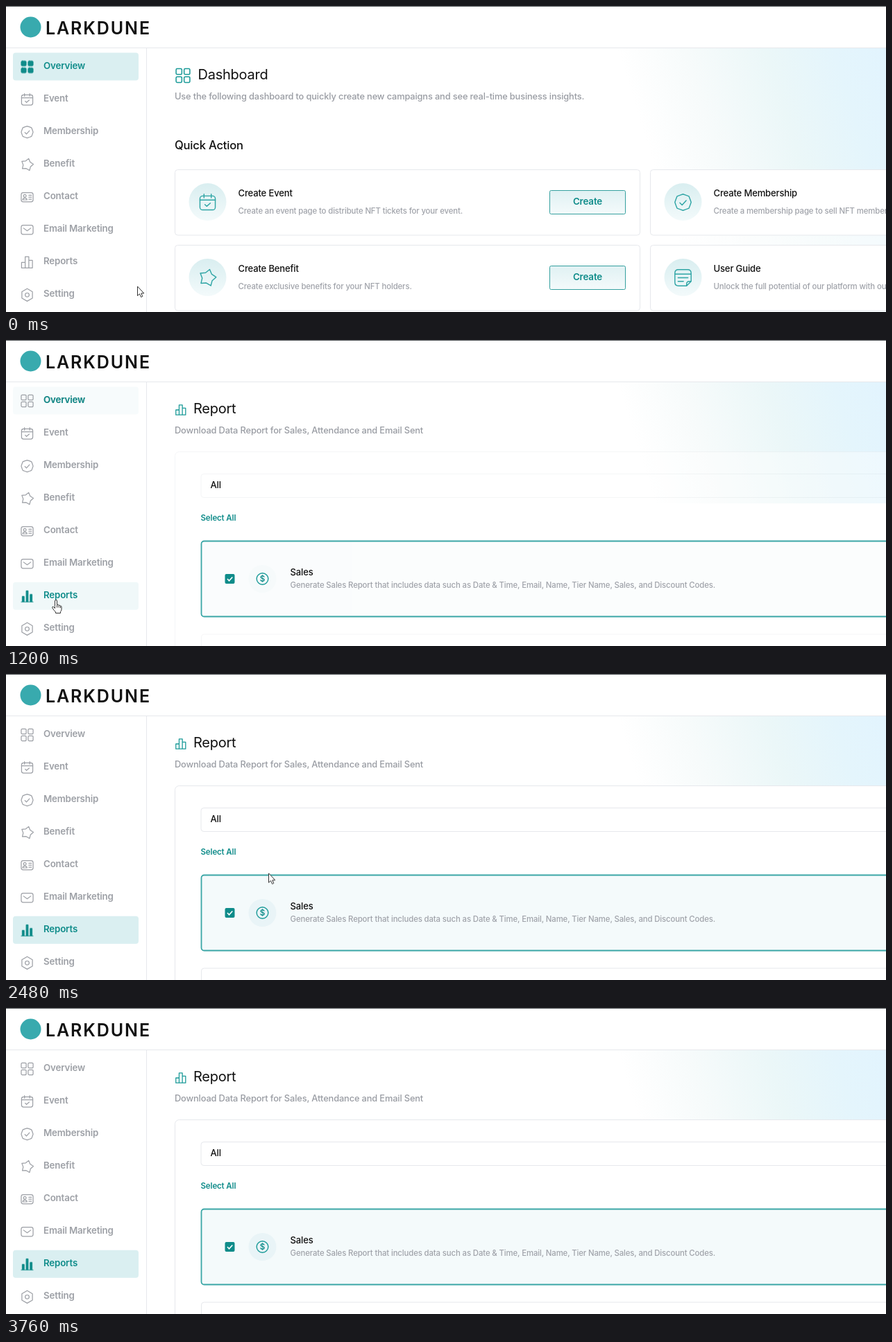
Animation of 1268 by 442 pixels, one loop 4 s. Source, as an HTML page:

```html
<!DOCTYPE html>
<html lang="en">
<head>
<meta charset="utf-8">
<title>Dashboard</title>
<style>
html, body { margin: 0; width: 100%; height: 100%; overflow: hidden; background: #fff; }
svg { display: block; width: 1268px; height: 442px; }
text { font-family: Inter, "Open Sans", sans-serif; font-weight: 500; letter-spacing: -.012em; fill: #111; stroke: none; }
use { fill: none; stroke: currentColor; stroke-linecap: round; stroke-linejoin: round; }
#tiles use { fill: inherit; }
.brand { font-size: 25px; font-weight: 600; letter-spacing: 1.9px; }
.title { font-size: 20px; font-weight: 420; }
.sub { font-size: 12.85px; fill: #999ca3; }
.section { font-size: 16.6px; }
.name { font-size: 13.05px; }
.note { font-size: 11.4px; fill: #a0a3aa; }
.menu { font-size: 13.3px; font-weight: 600; fill: #9da0a6; }
.button { font-size: 13.4px; font-weight: 600; text-anchor: middle; }
.link { font-size: 11.5px; font-weight: 600; }
.teal { fill: #0f8c8a; }
.line { fill: #fff; stroke: #e6e8ec; }
.grey { color: #9da0a6; }
.green { color: #1a9a98; }
.action { color: #2fa5a5; }
.solid { color: #0f8c8a; }
.solid use { fill: currentColor; }
.bar { fill: #daeff1; }

.before, .late, .leaving, .after, .ramp, .pointer, .pointer > * {
  animation: 4s step-end infinite;
}
.before { animation-name: before; }
.after { animation-name: after; }
.late { animation-name: late; }
.leaving { animation-name: leaving; }
.ramp { animation-name: ramp; }
@keyframes before { 0% { opacity: 1 } 30%, 100% { opacity: 0 } }
@keyframes after { 0% { opacity: 0 } 30%, 100% { opacity: 1 } }
@keyframes late { 0% { opacity: 1 } 34%, 100% { opacity: 0 } }
@keyframes leaving { 0% { opacity: 1 } 30% { opacity: .2 } 32% { opacity: .1 } 34% { opacity: .05 } 36%, 100% { opacity: 0 } }
@keyframes ramp { 0% { opacity: 0 } 30% { opacity: .4 } 32% { opacity: .7 } 34% { opacity: .9 } 36%, 100% { opacity: 1 } }

/* The pointer advances every 80 ms, 2% of the loop. */
.pointer { animation-name: travel; }
@keyframes travel {
  0% { transform: translate(189px, 405px); animation-timing-function: steps(2) }
  4% { transform: translate(152px, 399px); animation-timing-function: steps(2) }
  8% { transform: translate(105px, 386px); animation-timing-function: steps(3) }
  14% { transform: translate(72px, 378px) }
  16%, 42% { transform: translate(72px, 375px) }
  44% { transform: translate(112px, 377px); animation-timing-function: steps(4) }
  52% { transform: translate(400px, 367px); animation-timing-function: steps(3) }
  58% { transform: translate(418px, 372px); animation-timing-function: steps(7) }
  72% { transform: translate(278px, 77px); animation-timing-function: steps(3) }
  78% { transform: translate(320px, 74px); animation-timing-function: steps(3) }
  84% { transform: translate(526px, 50px); animation-timing-function: steps(4) }
  92% { transform: translate(715px, 3px) }
  94%, 100% { transform: translate(740px, -30px) }
}
.pointer > .arrow { animation-name: arrow; }
.pointer > .hand { animation-name: hand; }
.pointer > .blur { animation-name: blur; }
@keyframes arrow { 0% { opacity: 1 } 2% { opacity: 0 } 46% { opacity: 1 } 50% { opacity: 0 } 62%, 100% { opacity: 1 } }
@keyframes hand { 0% { opacity: 0 } 2% { opacity: 1 } 46% { opacity: 0 } 50% { opacity: 1 } 52% { opacity: 0 } 54% { opacity: 1 } 62%, 100% { opacity: 0 } }
@keyframes blur { 0% { opacity: 0 } 52% { opacity: 1 } 54%, 100% { opacity: 0 } }
</style>
</head>
<body>
<svg viewBox="0 0 1268 442" xmlns="http://www.w3.org/2000/svg">
  <defs>
    <linearGradient id="tint" gradientUnits="userSpaceOnUse" x1="880" y1="60" x2="1234" y2="-51">
      <stop offset="0" stop-color="#fff"/>
      <stop offset=".25" stop-color="#f7fbfb"/>
      <stop offset=".55" stop-color="#ebf7f8"/>
      <stop offset=".8" stop-color="#e4f5fc"/>
      <stop offset="1" stop-color="#e2f4fe"/>
    </linearGradient>
    <linearGradient id="fade" x2="0" y2="1">
      <stop stop-color="#fff" stop-opacity="0"/><stop offset=".5" stop-color="#fff" stop-opacity=".6"/>
    </linearGradient>
    <linearGradient id="halo" x2="0" y2="1">
      <stop stop-color="#d9eef0"/><stop offset="1" stop-color="#f3fafb"/>
    </linearGradient>
    <linearGradient id="press" x2="0" y2="1">
      <stop stop-color="#e0f1f3"/><stop offset="1" stop-color="#f4fafb"/>
    </linearGradient>
    <radialGradient id="smudge">
      <stop stop-color="#cfc6bd"/><stop offset=".55" stop-color="#a3958b"/>
      <stop offset=".85" stop-color="#8d8079"/><stop offset="1" stop-color="#b5aaa4" stop-opacity="0"/>
    </radialGradient>
    <path id="tile" d="M-7.500-9h4.500q1.500 0 1.500 1.500v4.500q0 1.500-1.500 1.500h-4.500q-1.500 0-1.500-1.500v-4.500q0-1.500 1.500-1.500z"/>
    <g id="tiles">
      <use href="#tile"/><use href="#tile" x="10.500"/><use href="#tile" y="10.500"/><use href="#tile" x="10.500" y="10.500"/>
    </g>
    <g id="event">
      <rect x="-8.500" y="-7" width="17" height="15.500" rx="3"/>
      <path d="M-8.500-2.500H8.500M-4-9v4M4-9v4M-3 2.500l2 2 4-3.500"/>
    </g>
    <path id="badge" d="M0-9 3.500-7.800 6.600-6.600 7.800-3.500 9 0 7.800 3.500 6.600 6.600 3.500 7.800 0 9-3.500 7.800-6.600 6.600-7.800 3.500-9 0-7.800-3.500-6.600-6.600-3.500-7.800zM-3.500.5l2.500 2.500 4.500-5"/>
    <path id="star" transform="rotate(14)" d="M0-9.500 3.500-4.900 9-2.900 5.700 1.900 5.600 7.700 0 6-5.600 7.700-5.700 1.900-9-2.900-3.500-4.900z"/>
    <g id="contact">
      <rect x="-9" y="-7" width="18" height="14" rx="3"/><circle cx="-3.500" cy="-2" r="2"/>
      <path d="M-6.800 4q.5-2.800 3.300-2.800T-.2 4zM2.500-3h4M2.500 0h4M2.500 3h4"/>
    </g>
    <g id="mail"><rect x="-9" y="-7" width="18" height="14" rx="3"/><path d="M-5.500-2.500 0 1.500 5.500-2.500"/></g>
    <path id="bars" d="M-8.500 8.500V0H-3v8.500zM-3 8.500v-17h5.500v17zM2.500 8.500V-3H8v11.500z"/>
    <path id="blocks" d="M-7.500 8V0h3v8zM-1.500 8V-8.500h3V8zM4.500 8v-11h3V8zM-9 8.500H9"/>
    <g id="setting"><path d="M0-9.500 8-4.800V4.800L0 9.500-8 4.800V-4.800z"/><circle r="3"/></g>
    <path id="guide" d="M-5-9H5q4 0 4 4V4L4 9H-5q-4 0-4-4V-5q0-4 4-4zM9 4H7Q4 4 4 7v2M-9-4H9M-5.500 0h11M-5.500 4h6"/>
  </defs>

  <rect width="1268" height="442" fill="#fff"/>
  <rect x="203" y="61" width="1065" height="381" fill="url(#tint)"/>
  <rect x="203" y="230" width="1065" height="212" fill="url(#fade)"/>
  <g id="dashboard" class="before"></g>
  <g id="report"></g>

  <path d="M0 60.500H1268M202.500 60V442" stroke="#e6e8ec"/>
  <path d="M0 .5H1268" stroke="#55585c"/>
  <circle cx="35.500" cy="30.500" r="15" fill="#38aaae"/>
  <text class="brand" x="57" y="41">LARKDUNE</text>
  <g id="side"></g>

  <g class="pointer">
    <path class="arrow" d="M.5 0V13.500L3.500 10.800 5.600 15.500 7.800 14.500 5.800 10H9.800z" fill="#fff" stroke="#333" stroke-linejoin="round"/>
    <path class="hand" d="M-1.500 9.500V2Q-1.500.5 0 .5T1.500 2V7.500Q3.500 6.500 4 8.300 6 7.500 6.300 9.200 8 8.700 8 10.500V14Q8 16 6.500 17.500V19.500H-.5V18Q-3 15.500-5.300 11.800-5.500 9.800-3.800 10.300L-1.500 12.500zM1.500 8v3.500M4 8.500v3M6.300 9.500v2.500" fill="#fff" stroke="#333" stroke-linejoin="round"/>
    <circle class="blur" cx="2" cy="7" r="8.500" fill="url(#smudge)"/>
  </g>
</svg>
<script>
const byId = id => document.getElementById(id);
const text = (cls, x, y, s) => `<text class="${cls}" x="${x}" y="${y}">${s}</text>`;
const icon = (id, x, y, scale = 1, width = 1.3) =>
  `<use href="#${id}" transform="translate(${x} ${y}) scale(${scale})" stroke-width="${width}"/>`;
const box = (cls, x, y, w, h, r = 4) =>
  `<rect class="${cls}" x="${x}" y="${y}" width="${w}" height="${h}" rx="${r}"/>`;

function menuItem([id, label], i) {
  const y = 88 + 47.05 * i;
  const plain = icon(id, 30.5, y, .95) + text("menu", 54, y + 3, label);
  const bar = cls => box(`bar ${cls}`, 10, y - 20.5, 181, 40);
  const active = (mark, cls) => `<g class="solid ${cls}">${icon(mark, 30.5, y, .95, 1)}</g>`;
  const bold = cls => `<g class="${cls}">${text("menu teal", 54, y + 3, label)}</g>`;
  if (id === "tiles")
    return bar("leaving") + `<g class="after">${plain}</g>` + bold("late") + active("tiles", "before");
  if (id === "bars")
    return bar("ramp") + `<g class="before">${plain}</g>` + bold("after") + active("blocks", "after");
  return plain;
}

const menu = [
  ["tiles", "Overview"], ["event", "Event"], ["badge", "Membership"], ["star", "Benefit"],
  ["contact", "Contact"], ["mail", "Email Marketing"], ["bars", "Reports"], ["setting", "Setting"]
];
byId("side").innerHTML = `<g class="grey">${menu.map(menuItem).join("")}</g>`;

function actionCard(x, y, id, name, note) {
  const button = x < 900
    ? `<rect x="${x + 540}" y="${y + 30}" width="109" height="34" rx="2" fill="url(#press)" stroke="#35a09f"/>`
      + text("button teal", x + 594.5, y + 50.5, "Create")
    : "";
  return box("line", x, y, 670, 94.5)
    + `<circle cx="${x + 47}" cy="${y + 46.5}" r="27" fill="url(#halo)"/>`
    + `<g class="action">${icon(id, x + 47, y + 47, 1.3, 1.1)}</g>`
    + text("name", x + 91, y + 38.5, name) + text("note", x + 91, y + 63, note) + button;
}

byId("dashboard").innerHTML = `<g class="green">`
  + icon("tiles", 255, 100.5, 1.1, 1.4)
  + text("title", 276.5, 106, "Dashboard")
  + text("sub", 243, 135, "Use the following dashboard to quickly create new campaigns and see real-time business insights.")
  + text("section", 243, 206.5, "Quick Action")
  + actionCard(243.5, 236.5, "event", "Create Event", "Create an event page to distribute NFT tickets for your event.")
  + actionCard(928.5, 236.5, "badge", "Create Membership", "Create a membership page to sell NFT memberships.")
  + actionCard(243.5, 345.5, "star", "Create Benefit", "Create exclusive benefits for your NFT holders.")
  + actionCard(928.5, 345.5, "guide", "User Guide", "Unlock the full potential of our platform with our guide.")
  + `</g>`;

byId("report").innerHTML = `<rect class="after" x="244" y="236" width="1024" height="206" fill="#fff"/>`
  + `<g class="ramp">`
  + box("line", 243.5, 161.5, 1100, 400, 6)
  + box("line", 281, 193.5, 1060, 34)
  + `<rect x="282" y="291" width="1060" height="108" rx="3" fill="#f4fafb"/>`
  + `<circle cx="369.500" cy="345" r="20" fill="#e9f4f7"/>`
  + box("line", 281.5, 425, 1060, 110)
  + `</g><g class="after green">`
  + icon("bars", 252, 101, .85, 1.5)
  + text("title", 270, 106, "Report")
  + text("sub", 243, 135, "Download Data Report for Sales, Attendance and Email Sent")
  + text("name", 294.5, 213.5, "All")
  + text("link teal", 280.5, 261, "Select All")
  + `<rect x="281.500" y="290.500" width="1060" height="109" rx="4" fill="none" stroke="#3aa6a6" stroke-width="1.800"/>`
  + `<rect x="315.500" y="338" width="14" height="14" rx="2" fill="#0f8c8a"/>`
  + `<path d="M319 345l2.500 2.800 4.800-5.300" fill="none" stroke="#fff" stroke-width="1.600"/>`
  + `<circle cx="369.500" cy="345" r="8.300" fill="none" stroke="#1a9a98" stroke-width="1.400"/>`
  + `<text class="link teal" x="369.500" y="349" text-anchor="middle">$</text>`
  + text("name", 409.5, 339.5, "Sales")
  + text("note", 409.5, 357.5, "Generate Sales Report that includes data such as Date &amp; Time, Email, Name, Tier Name, Sales, and Discount Codes.")
  + `</g>`;
</script>
</body>
</html>
```
